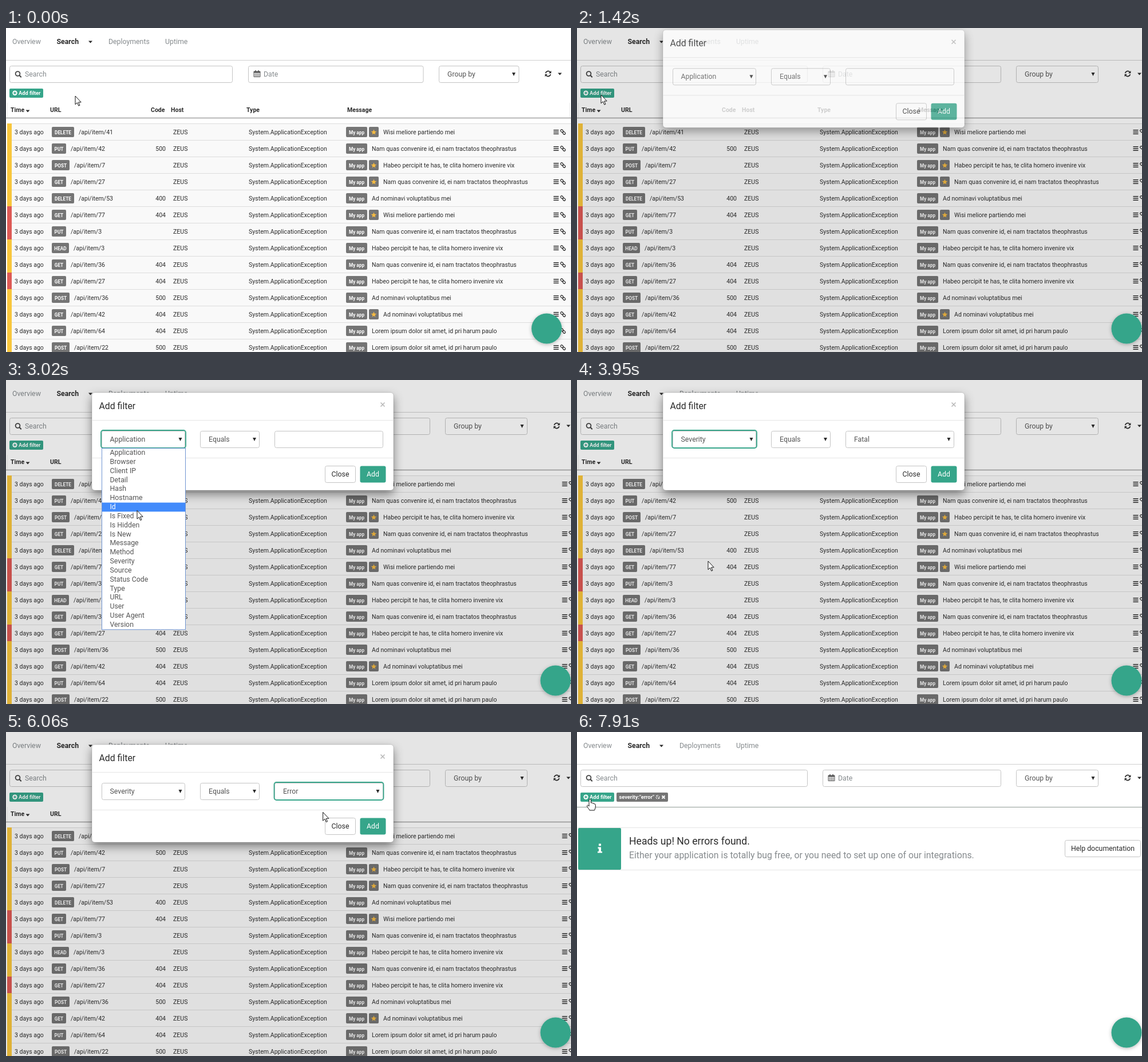
Write an HTML page that moves like this. It is 987 px wide and 567 px high and loops after 7.99 s.

```html
<!DOCTYPE html>
<html lang="en">
<head>
<meta charset="utf-8">
<title>Add filter</title>
<style>
  html, body { margin: 0; width: 100%; height: 100%; overflow: hidden; background: #fff; }
  svg { display: block; width: 100%; height: 100%; font-family: Roboto, sans-serif; }
  text { white-space: pre; }
</style>
</head>
<body>
<svg id="stage" viewBox="0 0 987 567"></svg>
<script>
const LOOP = 7990;
const GREEN = '#36a58a', GREY = '#757575', INK = '#2b2b2b', MUTED = '#868b8e';
const SMALL = 10.56, BASE = 12.32, LARGE = 15.84;
const ITEM = 15.84, LIST_TOP = 119;

const FIELDS = ['Application', 'Browser', 'Client IP', 'Detail', 'Hash', 'Hostname', 'Id', 'Is Fixed',
  'Is Hidden', 'Is New', 'Message', 'Method', 'Severity', 'Source', 'Status Code', 'Type', 'URL',
  'User', 'User Agent', 'Version'];
const LEVELS = ['Fatal', 'Error', 'Warning', 'Information', 'Debug', 'Verbose'];
const MESSAGES = ['Wisi meliore partiendo mei', 'Nam quas convenire id, ei nam tractatos theophrastus',
  'Habeo percipit te has, te clita homero invenire vix', 'Ad nominavi voluptatibus mei',
  'Lorem ipsum dolor sit amet, id pri harum paulo'];
const BADGE_WIDTH = { DELETE: 39, PUT: 25, POST: 31, GET: 25, HEAD: 30 };
// severity, method, item, code, starred, message
const ROWS = `Y DELETE 41 - * 0|Y PUT 42 500 - 1|Y POST 7 - * 2|Y GET 27 - * 1|Y DELETE 53 400 - 3
R GET 77 404 * 0|R PUT 3 - - 1|Y HEAD 3 - - 2|Y GET 36 404 - 1|R GET 27 404 - 2
Y POST 36 500 - 3|Y GET 42 404 * 3|Y PUT 64 404 - 4|Y POST 22 500 - 4`
  .split(/[|\n]/).map(row => row.split(' '));

// start, end, x, y of each pointer move
const POINTER_START = [121, 119];
const MOVES = [
  [450, 1130, 42, 117], [1500, 2100, 229, 115], [2735, 3480, 229, 317], [4080, 4740, 564, 94],
  [5080, 5290, 543, 132], [5480, 5520, 543, 137], [6020, 6640, 640, 168], [7250, 7890, 23, 118],
];

const text = (x, y, content, size = BASE, fill = INK, extra = '') =>
  `<text x="${x}" y="${y}" font-size="${size}" fill="${fill}" ${extra}>${content}</text>`;
const bold = (x, y, content, size, fill) => text(x, y, content, size, fill, 'font-weight="700"');
const rect = (x, y, w, h, fill, extra = '') =>
  `<rect x="${x}" y="${y}" width="${w}" height="${h}" fill="${fill}" ${extra}/>`;
const box = (x, y, w, h, extra = '') =>
  rect(x + .5, y + .5, w - 1, h - 1, '#fff', `rx="3" stroke="#c4c4c4" ${extra}`);
const path = (d, fill = INK, extra = '') => `<path d="${d}" fill="${fill}" ${extra}/>`;
const line = (d, color, width = 1) => path(d, 'none', `stroke="${color}" stroke-width="${width}"`);
const caret = (x, y) => path(`M${x - 3.5} ${y - 1.5}h7l-3.5 4z`);
const selectArrow = (x, y) => path(`M${x - 3} ${y - 3}h6l-3 6z`);
const group = (id, content, extra = '') => `<g id="${id}" ${extra}>${content}</g>`;

function star(x, y) {
  const points = Array.from({ length: 10 }, (_, i) => {
    const r = i % 2 ? 2.2 : 5, a = i * Math.PI / 5;
    return `${(x + r * Math.sin(a)).toFixed(1)},${(y - r * Math.cos(a)).toFixed(1)}`;
  });
  return `<polygon points="${points.join(' ')}" fill="#f6bb42"/>`;
}

function calendar(x, y) {
  return path(`M${x} ${y + 2}h11v9.5h-11z`, 'none', 'stroke="#555"') + rect(x, y + 2, 11, 2.5, '#555')
    + line(`M${x + 3} ${y}v3M${x + 8} ${y}v3`, '#555', 1.6)
    + line(`M${x} ${y + 7}h11M${x} ${y + 9.3}h11M${x + 2.8} ${y + 4}v7M${x + 5.5} ${y + 4}v7M${x + 8.2} ${y + 4}v7`, '#555', .6);
}

function refresh(x, y) {
  return `<g transform="translate(${x} ${y})">`
    + line('M-4.4-1A4.5 4.5 0 0 1 3.4-3M4.4 1A4.5 4.5 0 0 1-3.4 3', INK, 1.7)
    + path('M5.4-5.2V-.8H1zM-5.4 5.2V.8H-1z') + '</g>';
}

function link(x, y) {
  return `<g transform="translate(${x} ${y}) rotate(45)" fill="none" stroke="${INK}" stroke-width="1.2">
    <rect x="-5.2" y="-1.9" width="5" height="3.8" rx="1.8"/><rect x=".2" y="-1.9" width="5" height="3.8" rx="1.8"/></g>`;
}

function chrome(wide) {
  const [searchW, dateX, dateW, groupX, groupW, iconX] = wide
    ? [397, 429, 312, 767, 144, 962] : [390, 423, 306.5, 756, 140.5, 947];
  return rect(0, 0, 987, 567, '#fff')
    + text(11, 28, 'Overview', BASE, MUTED) + bold(88.5, 28, 'Search') + caret(147.5, 24)
    + text(179, 28, 'Deployments', BASE, MUTED) + text(278, 28, 'Uptime', BASE, MUTED)
    + line('M0 56.5H987', '#cfcfcf')
    + box(6, 66, searchW, 30) + text(33, 85, 'Search', BASE, MUTED)
    + '<circle cx="20.5" cy="80" r="3.9" fill="none" stroke="#444" stroke-width="1.8"/>' + line('M23.3 82.8l3.4 3.4', '#444', 2)
    + box(dateX, 66, dateW, 30) + calendar(dateX + 10, 74) + text(dateX + 27, 85, 'Date', BASE, MUTED)
    + box(groupX, 66, groupW, 30) + text(groupX + 15, 85, 'Group by', BASE, '#555') + selectArrow(groupX + groupW - 9.5, 81)
    + refresh(iconX, 80) + caret(iconX + 20.5, 80)
    + rect(6, 106, 59, 16, GREEN, 'rx="2"') + '<circle cx="15.5" cy="113.7" r="4.2" fill="#fff"/>'
    + line('M13 113.7h5M15.5 111.2v5', GREEN, 1.4) + bold(22, 117, 'Add filter', 9.24, '#fff');
}

function tableRow([severity, method, item, code, starred, message], i, shift) {
  const top = 167 + 29 * i, y = top + 19, w = BADGE_WIDTH[method], isStarred = starred === '*';
  const badge = (x, width, label) => rect(x, top + 6, width, 18, GREY, 'rx="2"')
    + text(x + width / 2, top + 18.5, label, 8.25, '#fff', 'font-weight="700" text-anchor="middle"');
  return rect(2, top, 985, 29, '#f9f9f9') + line(`M2 ${top + .5}H987`, '#dcdcdc')
    + rect(2, top, 8, 29, severity === 'R' ? '#dd5a56' : '#f8c63d')
    + text(15, y, '3 days ago', SMALL)
    + badge(80, w, method) + text(80 + w + 8, y, '/api/item/' + item, SMALL)
    + (code === '-' ? '' : text(279, y, code, SMALL, INK, 'text-anchor="end"'))
    + text(292, y, 'ZEUS', SMALL) + text(424, y, 'System.ApplicationException', SMALL)
    + badge(594, 37, 'My app')
    + (isStarred ? rect(634, top + 6, 17, 18, GREY, 'rx="2"') + star(642.5, top + 15.5) : '')
    + text(isStarred ? 659 : 639, y, MESSAGES[message], SMALL)
    + line(`M${956.5 + shift} ${top + 11.7}h9m-9 3.3h9m-9 3.3h9`, INK, 1.6) + link(973 + shift, top + 15);
}

function table(wide) {
  const heads = { 8: 'Time', 77: 'URL', 253: 'Code', 288: 'Host', 420: 'Type', 596: 'Message' };
  return Object.entries(heads).map(([x, label]) => bold(x, 147, label, SMALL)).join('') + caret(38, 145)
    + line('M2.5 131V157' + (wide ? '' : 'M984.5 131V157'), '#eee') + line('M0 157.5H987', '#a2a2a2', 1.4)
    + ROWS.map((row, i) => tableRow(row, i, wide ? 15 : 0)).join('');
}

function emptyResult() {
  return rect(69, 106, 90, 16, GREY, 'rx="2"') + bold(73.5, 117, 'severity:"error"', 9.24, '#fff')
    + '<circle cx="141" cy="114" r="3" fill="none" stroke="#fff" stroke-dasharray="4 1.5"/>' + line('M138 111l6 6', '#fff', .8)
    + line('M148.5 111.5l5 5m0-5l-5 5', '#fff', 1.9)
    + line('M0 131.5H987', '#8f9a95') + line('M2 167.5H987M2 241.5H987', '#e4e4e4')
    + rect(2, 168, 75, 73, GREEN, 'rx="2"')
    + path('M36.5 201.5h5.5v7.5h2v2.5h-8v-2.5h2v-5h-1.5zM38 195.500h4v3.800h-4z', '#fff')
    + text(91, 197, 'Heads up! No errors found.', 17.6) + text(91, 221, 'Either your application is totally bug free, or you need to set up one of our integrations.', LARGE, MUTED)
    + box(852, 189, 133, 30) + text(918.5, 207.500, 'Help documentation', BASE, INK, 'text-anchor="middle"');
}

const ring = (id, x, w) =>
  rect(x, 88, w, 31, 'none', `id="${id}" rx="4" stroke="${GREEN}" stroke-width="1.8"`);

function dropdown(id, x, w, items) {
  return group(id, rect(x + .5, LIST_TOP + .5, w - 1, items.length * ITEM + .5, '#fff', 'stroke="#6f95d2"')
    + rect(x + 1, 0, w - 2, ITEM, '#428bfb', 'class="mark"')
    + items.map((item, i) => text(x + 14.5, LIST_TOP + 12 + i * ITEM, item, BASE, '#555', 'class="item"')).join(''));
}

function modal() {
  return rect(150, 22, 527, 171, '#fff', 'rx="5" stroke="#000" stroke-opacity=".15" filter="url(#shadow)"')
    + text(162.500, 51, 'Add filter', LARGE) + line('M654.500 39.500l7 7m0-7l-7 7', '#b8b8b8', 1.6)
    + line('M150 70.5H677M150 136.5H677', '#e5e5e5')
    + box(167, 89, 146, 30) + text(181.5, 108, '', BASE, '#555', 'id="field"') + selectArrow(304.5, 104)
    + box(339, 89, 104, 30) + text(354, 108, 'Equals', BASE, '#555') + selectArrow(434, 104)
    + box(469, 89, 190, 30) + text(484, 108, '', BASE, '#555', 'id="level"') + group('levelArrow', selectArrow(649.5, 104))
    + ring('fieldRing', 166, 148) + ring('levelRing', 468.5, 191)
    + box(557, 150, 54, 30) + text(584, 168.5, 'Close', BASE, INK, 'text-anchor="middle"')
    + rect(618.5, 150.5, 45, 29, GREEN, 'id="add" rx="3"') + text(641, 168.5, 'Add', BASE, '#fff', 'text-anchor="middle"')
    + dropdown('fieldList', 167, 147, FIELDS) + dropdown('levelList', 469.5, 189.5, LEVELS);
}

document.getElementById('stage').innerHTML = `<defs>
  <filter id="shadow" x="-20%" y="-20%" width="140%" height="160%"><feDropShadow dx="0" dy="7" stdDeviation="8.5" flood-opacity=".45"/></filter>
  <filter id="soft" x="-30%" y="-30%" width="160%" height="160%"><feDropShadow dx="0" dy="1.500" stdDeviation="3" flood-opacity=".28"/></filter></defs>`
  + group('narrowPage', chrome(false) + table(false)) + group('widePage', chrome(true) + table(true))
  + group('emptyPage', chrome(true) + emptyResult())
  + rect(0, 0, 987, 567, '#000', 'id="dim"') + group('modal', modal())
  + `<circle id="chat" cy="526" r="26.5" fill="${GREEN}" filter="url(#soft)"/>`
  + path('M-2 551.5H211Q214.500 551.500 214.500 555V570H-2Z', '#f4f4f4', 'id="status" stroke="#c2c2c2"')
  + group('pointer', path('M0 0V14.800L3.400 11.700 5.800 17.200 7.900 16.300 5.600 10.900H10.200Z', '#fff', 'id="arrow"')
    + path('M-2 10V1Q-2-.8-.3-.8 1.400-.8 1.400 1V6Q4 5 4.600 7 7 6 7.200 8 9.300 7.500 9.300 9.500V13Q9 16 7.500 19H-1Q-2 17-5 13-6.500 10.500-4.500 10-3 10-2 12Z', '#fff', 'id="hand"')
    , 'stroke="#111" stroke-width="1" stroke-linejoin="round"');

const ui = Object.fromEntries([...document.querySelectorAll('#stage [id]')].map(node => [node.id, node]));
const set = (node, attributes) => Object.entries(attributes).forEach(([k, v]) => node.setAttribute(k, v));
const show = (node, visible) => set(node, { visibility: visible ? 'visible' : 'hidden' });
const progress = (t, start, end) => Math.min(1, Math.max(0, (t - start) / (end - start)));
const easeOut = p => 1 - (1 - p) ** 1.7;
const between = (t, start, end) => t >= start && t < end;

function pointerAt(t) {
  let [x, y] = POINTER_START;
  for (const [start, end, toX, toY] of MOVES) {
    const p = easeOut(progress(t, start, end));
    x += (toX - x) * p;
    y += (toY - y) * p;
  }
  return [x, y];
}

function updateList(list, open, y) {
  set(list, { display: open ? 'inline' : 'none' });
  if (!open) return;
  const items = [...list.querySelectorAll('.item')];
  const active = Math.min(items.length - 1, Math.max(0, Math.floor((y - LIST_TOP - 1) / ITEM)));
  set(list.querySelector('.mark'), { y: LIST_TOP + .5 + active * ITEM });
  items.forEach((item, i) => set(item, { fill: i === active ? '#fff' : '#555' }));
}

function render(t) {
  const [x, y] = pointerAt(t);
  const wide = t >= 1155, done = t >= 7100;
  set(ui.narrowPage, { display: wide ? 'none' : 'inline' });
  set(ui.widePage, { display: wide && !done ? 'inline' : 'none' });
  set(ui.emptyPage, { display: done ? 'inline' : 'none' });
  set(ui.chat, { cx: wide ? 960 : 944.5 });

  set(ui.dim, { opacity: .1 * (progress(t, 1155, 1305) - progress(t, 7000, 7130)) });
  const lift = 43 * (1 - easeOut(progress(t, 1305, 1605)) + easeOut(progress(t, 6850, 7150)));
  set(ui.modal, {
    opacity: progress(t, 1305, 1455) - progress(t, 6850, 7000),
    transform: `translate(0 ${-lift})`,
  });

  ui.field.textContent = t < 3950 ? 'Application' : 'Severity';
  ui.level.textContent = t < 3950 ? '' : t < 5830 ? 'Fatal' : 'Error';
  set(ui.levelArrow, { opacity: t < 3950 ? 0 : 1 });
  set(ui.fieldRing, { opacity: progress(t, 2300, 2450) - progress(t, 4790, 4940) });
  set(ui.levelRing, { opacity: progress(t, 4790, 4940) - progress(t, 6660, 6900) });
  updateList(ui.fieldList, between(t, 2330, 3950), y);
  updateList(ui.levelList, between(t, 4820, 5830), y);

  const overAdd = between(t, 6020, 7000) && x > 618 && y > 150;
  const overFilter = !between(t, 1155, 7100) && x < 65 && y > 106 && y < 122;
  set(ui.add, { fill: overAdd ? '#2a7762' : GREEN, stroke: between(t, 6650, 7000) ? '#5b93dc' : 'none', 'stroke-width': 1.8 });
  show(ui.status, between(t, 6800, 7300));

  set(ui.pointer, { transform: `translate(${x} ${y})` });
  show(ui.hand, overAdd || overFilter);
  show(ui.arrow, !(overAdd || overFilter));
}

const started = performance.now();
function tick() {
  render((performance.now() - started) % LOOP);
  requestAnimationFrame(tick);
}
tick();
</script>
</body>
</html>
```
